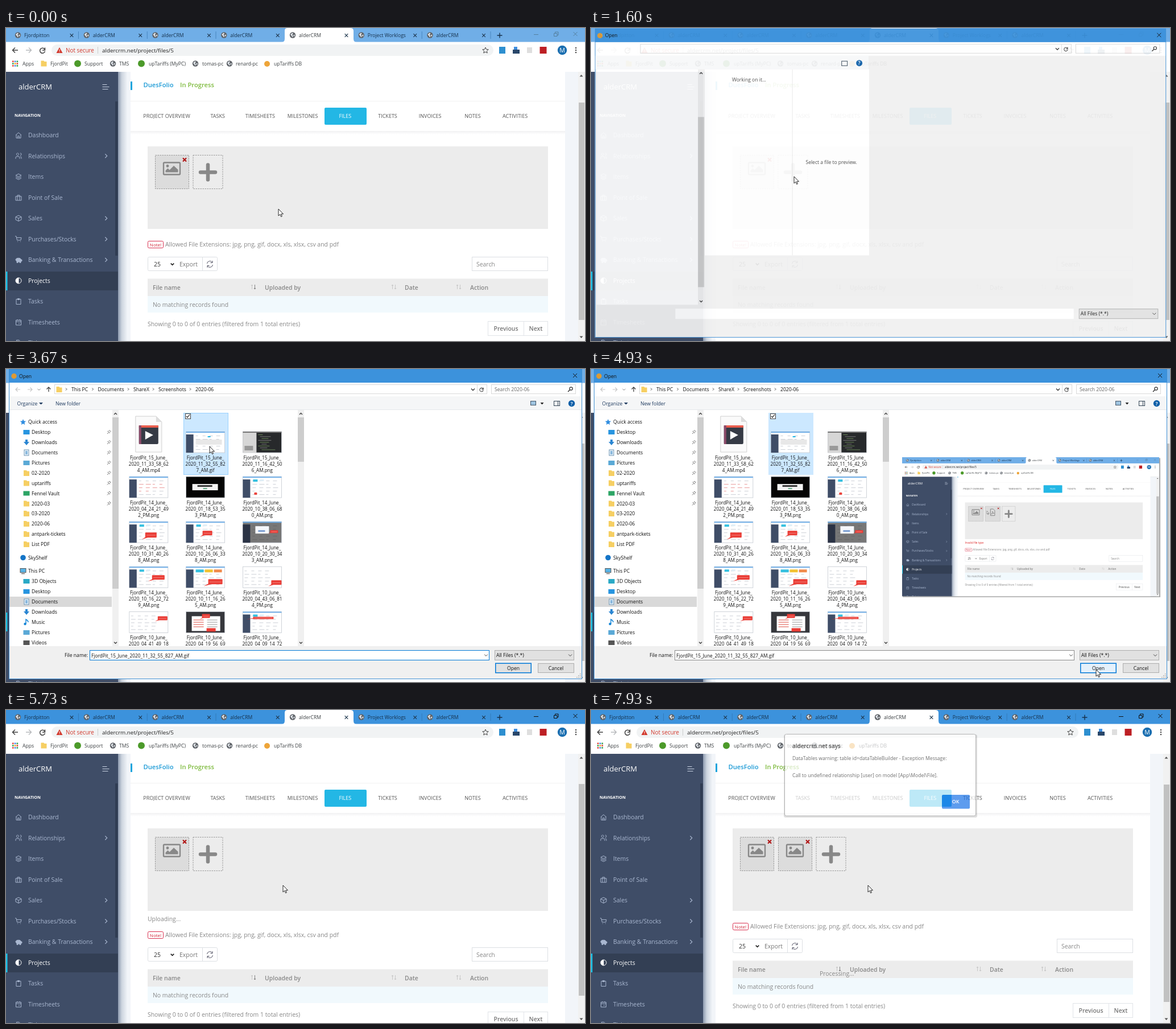
These frames come from a looping animation (1018x550 px, 8 s). An HTML page:

```html
<!DOCTYPE html>
<html lang="en">
<head>
<meta charset="utf-8">
<title>File upload</title>
<style>
html, body { margin: 0; width: 100%; height: 100%; overflow: hidden; background: #fff; }
svg { display: block; font-family: "Open Sans", "Noto Sans", sans-serif; }
text { white-space: pre; }
</style>
</head>
<body>
<svg width="1018" height="550" viewBox="0 0 1018 550">
  <defs>
    <linearGradient id="side"><stop stop-color="#8c99ae"/><stop offset=".3" stop-color="#cdd5df"/><stop offset=".75" stop-color="#f2f5f9"/></linearGradient>
    <linearGradient id="fall" x2="0" y2="1"><stop stop-color="#f1f1f2"/><stop offset="1" stop-color="#fff"/></linearGradient>
    <clipPath id="list"><rect x="200" y="72" width="313" height="415"/></clipPath>
    <clipPath id="stage"><rect width="1018" height="550"/></clipPath>
  </defs>
  <g id="page"></g><g id="dialog"></g><g id="alert"></g><g id="cursor"></g>
</svg>
<script>
const LOOP = 8000, BLUE = '#3c92dc', PALE = '#70aee7', INK = '#3c4043', GREY = '#888', SIDE = '#3f4d67';
const $ = id => document.getElementById(id);

// Drawing helpers, each returns markup
const R = (x, y, w, h, f, a = '') => `<rect x="${x}" y="${y}" width="${w}" height="${h}" fill="${f}" ${a}/>`;
const box = (x, y, w, h, line, f = 'none', a = '') => R(x + .5, y + .5, w - 1, h - 1, f, `stroke="${line}" ${a}`);
const C = (x, y, r, f, a = '') => `<circle cx="${x}" cy="${y}" r="${r}" fill="${f}" ${a}/>`;
const T = (x, y, s, c = GREY, z = 10.43, a = '') => `<text x="${x}" y="${y}" fill="${c}" font-size="${z}" ${a}>${s}</text>`;
const L = (d, c, w = 1, a = '') => `<path d="${d}" stroke="${c}" stroke-width="${w}" fill="none" ${a}/>`;
const F = (d, c, a = '') => `<path d="${d}" fill="${c}" ${a}/>`;
const G = (x, y, s, a = '') => `<g transform="translate(${x} ${y}) ${a}">${s}</g>`;
const UI = (x, y, s, c = '#111', z = 8.6, a = '') => T(x, y, s, c, z, a);
const MID = 'text-anchor="middle" ', SEMI = 'font-weight="600"';
const cross = (x, y, r, c, w) => L(`M${x - r} ${y - r}l${2 * r} ${2 * r}m0 ${-2 * r}l${-2 * r} ${2 * r}`, c, w);
const chevron = (x, y, r, c, w = 1) => L(`M${x - r} ${y - r / 2}l${r} ${r} ${r} ${-r}`, c, w);
const right = (x, y, r, c, w = 1) => L(`M${x - r / 2} ${y - r}l${r} ${r} ${-r} ${r}`, c, w);
const reload = (x, y, r, c, w) => L(`M${x + r} ${y - r}v${r}h${-r}M${x + r * .9} ${y - r * .3}a${r} ${r} 0 1 0 ${r * .1} ${r * .7}`, c, w);
const folder = (x, y) => F(`M${x - 5} ${y - 5}h5l1 1.5h4v8.5h-10z`, '#f6cf63');
const globe = (x, y) => C(x, y, 5.2, '#5f6368') + F(`M${x - 4} ${y - 1}l3-3 2 1-2 3 2 1-1 3zM${x + 1} ${y}l3-1-1 4z`, '#dfe3e8');

const MENU = [
  ['Dashboard', 'M-5 0L0-4.5 5 0M-4-1V5H4V-1M-1.3 5V1.5H1.3V5'],
  ['Relationships', 'M-5 5V3a2 2 0 0 1 2-2H0a2 2 0 0 1 2 2V5M-1.5-1a2 2 0 1 0-.1 0M3-5a2 2 0 0 1 0 4M3 1a2 2 0 0 1 2 2V5', 1],
  ['Items', 'M0-5L5-2.5 0 0-5-2.5ZM-5 0L0 2.5 5 0M-5 2.5L0 5 5 2.5'],
  ['Point of Sale', 'M-5-2H5V5H-5ZM-2-2V-4H2V-2M-2-2V5M2-2V5'],
  ['Sales', 'M0-5L5-2.5V2.5L0 5-5 2.5V-2.5ZM-5-2.5L0 0 5-2.5M0 0V5', 1],
  ['Purchases/Stocks', 'M-6-5H-4L-2.5 2H4L5-2.5H-3.5M-2 4.5h.8M3 4.5h.8', 1],
  ['Banking &amp; Transactions', 'M-5 0C-5-4 4-4 4-1L6 0V2L4 3V5H2V3.5H-1V5H-3V3Z', 1],
  ['Projects', 'M0-5A5 5 0 0 0 0 5ZM0-5A5 5 0 0 1 0 5'],
  ['Tasks', 'M-4-4H4V5H-4ZM-1.5-5H1.5V-3H-1.5Z'],
  ['Timesheets', 'M-4.5-3.5H4.5V5H-4.5ZM-4.5-1H4.5M-2-5V-3M2-5V-3M0 2h2'],
  ['Tickets', 'M-3.5-5H1L3.5-2V5H-3.5Z'],
];

function sidebar() {
  let s = R(197, 77, 22, 480, 'url(#side)') + R(0, 77, 197, 480, SIDE) + R(192, 129, 4.5, 271, '#303c52')
    + R(0, 428, 197, 33, '#333f54') + R(0, 428, 2.5, 33, '#1dc4e9')
    + T(22, 108, 'alderCRM', '#fff', 13) + L('M169.500 99.500h8M169.500 103.500h12M169.500 107.500h10', '#c8d2e2', 1.2)
    + T(15, 155.5, 'NAVIGATION', '#fff', 7.3, 'font-weight="700"');
  MENU.forEach(([name, icon, more], i) => {
    const y = 188.3 + i * 36.52, c = i == 7 ? '#fff' : '#a9b7d0';
    s += G(22, y, i == 6 || i == 7 ? F(icon.split('M0-5A5 5 0 0 1')[0], c) + L(icon, c) : L(icon, c))
      + T(39, y + 3.8, name, c) + (more ? right(176, y, 3.4, c, 1.2) : '');
  });
  return s;
}

function chrome(active) {
  let s = R(0, 0, 1018, 25, active ? BLUE : PALE) + R(0, 24.5, 1018, 52.5, '#fff')
    + F('M484 25q6 0 6-6V5q0-5 5-5h110q6 0 6 5v14q0 6 6 6z', '#fff');
  const titles = ['Fjordpitton', 'alderCRM', 'alderCRM', 'alderCRM', 'alderCRM', 'Project Worklogs', 'alderCRM'];
  titles.forEach((name, i) => {
    const x = 21 + i * 120.75;
    s += globe(x, 12.5) + UI(x + 11, 16, name, i == 4 ? INK : '#17324d') + cross(x + 94.5, 13, 2.8, '#20384f', 1.2);
    if (i != 3 && i != 4) s += R(x + 106, 6, 1, 13, '#2f6ea8', 'opacity=".6"');
  });
  const cap = active ? '#111' : '#55809f';
  s += L('M863.500 13h9M868 8.500v9', '#17324d', 1.4) + L('M928 11.500h8M963.500 9.500h5.500v5h-5.500zM965.500 9v-2h5.500v5.500h-2', cap) + cross(1001, 10.5, 3.5, cap, 1)
    + L('M21 39h-9M16 34.500l-4.500 4.500 4.500 4.500', '#444', 1.5) + L('M35 39h9M40 34.500l4.500 4.500-4.500 4.500', '#b8babd', 1.4) + reload(64, 39, 4.5, '#444', 1.5)
    + R(80, 29, 777, 20, '#f1f3f4', 'rx="10"') + F('M94 34l5.500 10h-11z', '#d2382c') + R(93.5, 37.5, 1.1, 3, '#fff') + R(93.5, 41.5, 1.1, 1, '#fff')
    + UI(105, 42.5, 'Not secure', '#d2382c', 9.9) + R(161, 33, 1, 12, '#ccc') + UI(169, 42.5, 'aldercrm.net/project/files/5', '#222', 9.85)
    + L('M843 34l1.500 3.500 3.700.300-2.800 2.500.800 3.700-3.200-2-3.200 2 .800-3.700-2.800-2.500 3.700-.300z', '#444')
    + R(867, 33, 11, 12, '#2d8fd0') + R(891, 38, 12, 7, '#29476a') + R(893, 33, 6, 5, '#3f8ee0') + R(916, 34, 9, 10, '#dedede') + R(938.5, 33, 12, 12, '#bd1f24')
    + C(978, 39, 8.2, '#1a6eb0') + UI(978, 42.8, 'M', '#fff', 10.5, MID);
  for (const y of [35, 39, 43]) s += C(1002, y, 1.2, '#444');
  for (let i = 0; i < 9; i++) s += R(11 + i % 3 * 3.8, 57.5 + (i / 3 | 0) * 3.8, 2.6, 2.6, ['#e2443b', '#f3a51d', '#35a252', '#4285f4'][(i * 3 + (i / 3 | 0)) % 4]);
  const marks = [[29, 'Apps'], [78, 'FjordPit'], [138, 'Support'], [199, 'TMS'], [251, 'upTariffs (MyPC)'], [345, 'tomas-pc'], [404, 'renard-pc'], [471, 'upTariffs DB']];
  for (const [x, name] of marks) s += UI(x, 66, name, INK);
  return s + folder(66.5, 62.5) + C(126, 62.5, 6, '#4c9a2a') + C(238, 62.5, 6, '#4c9a2a') + globe(188, 62.5) + globe(333, 62.5) + globe(393, 62.5) + C(459, 63, 5, '#eea53a');
}

const picture = L('M278.500 236.500h26q1.500 0 1.500 1.500v18q0 1.500-1.500 1.500h-26q-1.500 0-1.500-1.500v-18q0-1.500 1.500-1.500z', GREY, 2.4)
  + C(284, 242.5, 2.4, GREY) + F('M280.500 253.500v-3l4-4 3 3 7.500-7.500 7.500 7v4.500z', GREY);
const pdf = L('M283 234h11l6 6v20h-17z', GREY, 2.2) + L('M286 255q6-7 5-12 1 8 7 8-6-1-12 4', GREY, 1.8);
const dashed = (w, f) => R(262.5, 223.5, w, 59, f, 'stroke="#999" stroke-dasharray="2.5 1.5"');
const card = (x, icon) => G(x, 0, dashed(59, '#dcdcdc') + icon + cross(314, 231.5, 3, '#b00d0d', 2));

function files() {
  let s = box(249, 374, 28, 13, '#d9304f', '#fff', 'rx="2"') + T(263, 383.5, 'Note!', '#cf2436', 8, MID)
    + T(280, 384, 'Allowed File Extensions: jpg, png, gif, docx, xls, xlsx, csv and pdf')
    + box(249, 402, 123, 25, '#dcdfe3', '#fff', 'rx="2"') + R(345, 402, 1, 25, '#dcdfe3') + T(260, 418.8, '25', '#333') + chevron(292.5, 415, 2.8, '#222', 1.6)
    + T(305, 418.8, 'Export', '#777') + L('M353.500 414a5 5 0 0 1 9.300-2M363 409v3.500h-3.500M363.500 416a5 5 0 0 1-9.300 2M354 421v-3.500h3.500', '#556')
    + box(819, 402, 134, 25, '#dcdfe3', '#fff') + T(827, 418.8, 'Search')
    + R(249, 440.5, 704, 30.5, '#ececec') + R(249, 471, 704, 29, '#f1f9fd');
  for (const [x, name] of [[258, 'File name'], [455, 'Uploaded by'], [701, 'Date'], [816, 'Action']]) s += T(x, 460, name, GREY, 10.43, SEMI);
  [435, 682, 796].forEach((x, i) => {
    s += L(`M${x - 2.5} 459v-8m-1.500 2l1.500-2 1.500 2`, '#c4c4c4', .9) + L(`M${x + 2.5} 451v8m-1.500-2l1.500 2 1.500-2`, i ? '#c4c4c4' : '#777', .9);
  });
  return s + T(258, 489.5, 'No matching records found') + T(249, 524, 'Showing 0 to 0 of 0 entries (filtered from 1 total entries)')
    + box(847, 515, 106, 26, '#e1e4e8', '#fff') + R(910, 515, 1, 26, '#e1e4e8') + T(879, 532, 'Previous', '#777', 10.43, MID + SEMI) + T(931.5, 532, 'Next', '#777', 10.43, MID + SEMI);
}

function page({ active, icons = [picture], status = '', color = GREY, dy = 0, bar = [131, 382], busy }) {
  let s = R(219, 60, 764, 530, '#fff') + R(219, 94, 3, 15, '#1ba5dd') + T(241.5, 104, 'DuesFolio', '#1b9ad6', 11.2, SEMI) + T(306, 104, 'In Progress', '#7dba3c', 11.2, SEMI)
    + R(219, 128, 764, 1, '#f1f1f1') + R(219, 181, 764, 6, 'url(#fall)') + R(560, 140, 74, 30, '#23b7e5', 'rx="2"');
  ['PROJECT OVERVIEW', 'TASKS', 'TIMESHEETS', 'MILESTONES', 'FILES', 'TICKETS', 'INVOICES', 'NOTES', 'ACTIVITIES'].forEach((name, i) => {
    s += T(i ? 297.5 + i * 74.7 : 282.5, 158, name, i == 4 ? '#fff' : '#555', 9, MID);
  });
  s += R(249, 208, 704, 145, '#ececec') + icons.map((icon, i) => card(i * 67, icon)).join('')
    + G(icons.length * 67 - .5, 0, dashed(52, 'none') + L('M275.500 253.500h26M288.500 240.500v26', GREY, 6.5, 'stroke-linecap="round"'))
    + T(249, 371, status, color) + G(0, status ? 15 : 0, files());
  if (busy) s += T(402, 467, 'Processing...');
  return R(0, 77, 1018, 480, '#f2f5f9') + G(0, dy, s) + sidebar()
    + R(1006, 77, 12, 480, '#f1f1f1') + R(1007, bar[0], 10, bar[1], '#c1c1c1')
    + F('M1008.500 85.500h6l-3-3.500zM1008.500 541.500h6l-3 3.500z', '#555') + chrome(active);
}

const SHOTS = [
  ['15', '11_33_58_624_AM.mp4', 'video'], ['15', '11_32_55_827_AM.gif', 'drop'], ['15', '11_16_42_506_AM.png', 'code'],
  ['14', '04_24_21_492_PM.png', 'rows'], ['14', '01_18_53_353_PM.png', 'dark'], ['14', '10_38_06_680_AM.png', 'app', 20, 28, 5, 4],
  ['14', '10_31_40_268_AM.png', 'app', 28, 19, 20, 9], ['14', '10_26_06_338_AM.png', 'app', 29, 16, 17, 8], ['14', '10_20_30_343_AM.png', 'dim', 48, 15, 14, 5],
  ['14', '10_16_22_729_AM.png', 'app', 40, 15, 22, 8], ['14', '10_11_16_265_AM.png', 'tiles', 39, 22, 25, 9], ['10', '04_43_06_814_PM.png', 'table', 50, 24, 18, 8],
  ['10', '04_41_49_182_PM.png', 'table', 50, 8, 17, 7], ['10', '04_19_56_694_PM.png', 'black', 28, 4, 14, 7], ['10', '04_09_14_721_PM.png', 'app', 18, 9, 36, 4],
];
const PICK = 'FjordPit_15_June_2020_11_32_55_827_AM.gif';
const DARK = { code: '#27292b', dark: '#050505', black: '#36373c' };

function shot(kind, x, y, w, h) {
  if (kind == 'video') return F('M11-27h36l10 10v53H11z', '#fafafa', 'stroke="#d0d0d0"') + F('M47-27v10h10z', '#ddd')
    + R(17, -11, 34, 33, '#353a45', 'rx="2"') + R(17, -11, 34, 4, '#e95d4d') + R(17, -11, 4, 33, '#8a4a68') + F('M28-1l14 7-14 8z', '#fff');
  const plain = kind == 'table', dim = kind == 'dim';
  let s = R(0, 0, 68, 37, DARK[kind] || (dim ? '#777' : '#fff'), 'stroke="#c4c9d0" stroke-width=".8"');
  if (!DARK[kind]) {
    if (!plain) s += R(0, 0, 68, 2, PALE) + R(0, 5, 13, 32, dim ? '#2b3345' : SIDE);
    for (let i = 0; i < 20; i++) s += R((plain ? 3 : 17) + i % 4 * 12, 7 + (i >> 2) * 6, 4 + i * 7 % 6, 1, dim ? '#686868' : kind == 'rows' && i > 3 && i < 14 ? '#ea9b9b' : '#ccd0d6');
  }
  if (kind == 'app') s += R(18, 5, 8, 4, '#35c0df') + R(30, 5, 7, 3, '#dfeef6');
  if (kind == 'tiles') ['#35c0df', '#f2c230', '#f08a4b'].forEach((c, i) => { s += R(17 + i * 16, 5, 14, 5, c); });
  if (kind == 'drop') s += R(17, 14, 46, 9, '#e8e8e8') + R(38, 8, 5, 2, '#23b7e5');
  if (kind == 'code') {
    s += R(0, 0, 24, 37, '#d6d6d6') + R(0, 0, 68, 2, '#777') + R(3, 25, 15, 8, '#999');
    for (let i = 0; i < 9; i++) s += R(27 + i % 3 * 3, 5 + i * 3.3, 8 + i * 11 % 18, 1, i % 2 ? '#777' : '#688456');
  }
  if (kind == 'dark') s += R(11, 13, 45, 11, '#f4f4f4') + R(20, 15, 26, 3, '#333') + R(30, 20, 7, 2, '#6a8');
  if (dim) s += R(22, 8, 24, 13, '#f5f7fb') + R(27, 15, 12, 3, '#7b9ed2');
  if (kind == 'black') {
    s += R(10, 8, 50, 26, '#fff') + R(36, 29, 16, 6, '#ea3d36');
    for (let i = 0; i < 8; i++) s += R(13 + i % 2 * 24, 14 + (i >> 1) * 4, 18, 1.2, i % 2 ? '#aaa' : '#e36b61');
  }
  if (w) s += F(`M${x + 2} ${y + h - 2}l${-w * .4} ${h * .6} ${w * .8} ${-h * .6}z`, '#ea3d36') + R(x, y, w, h, '#ea3d36', 'rx="1"') + R(x + 2, y + h / 2, w - 4, .6, '#f6aaa5');
  return s;
}

const grid = () => SHOTS.map(([day, name, ...art], i) => {
  const x = 250.8 + i % 3 * 99.8, y = (i / 3 | 0) * 79.1;
  const lines = [`FjordPit_${day}_June_`, '2020_' + name.slice(0, 11), name.slice(11)];
  return G(x - 34, 110 + y, shot(...art)) + lines.map((s, k) => UI(x, 159 + y + k * 11, s, '#111', 8.1, MID)).join('');
}).join('');

const TREE = [
  [93, 'Quick access', 'star'], [111, 'Desktop', '#2795e0'], [129, 'Downloads', 'down'], [147, 'Documents', 'doc'], [165, 'Pictures', '#5aa9d6'],
  [183, '02-2020'], [200.5, 'uptariffs'], [218.5, 'Fennel Vault', '#2da565'], [236.5, '2020-03'], [254, '03-2020'], [272, '2020-06'], [290, 'antpark-tickets'], [308, 'List PDF'],
  [331.5, 'SkyShelf', 'disc'], [355, 'This PC', 'pc'], [373, '3D Objects', '#29a9c6'], [391, 'Desktop', '#2795e0'], [409, 'Documents', 'doc'],
  [427, 'Downloads', 'down'], [445, 'Music', 'note'], [463, 'Pictures', '#5aa9d6'], [481, 'Videos', '#555'],
];
const ICONS = {
  star: F('M0-5l1.500 3.500 3.700.300-2.800 2.500.800 3.700-3.200-2-3.200 2 .800-3.700-2.800-2.500 3.700-.300z', '#2f8de0'),
  down: F('M-2-5h4v4h3l-5 6-5-6h3z', '#2a86d2'), doc: R(-4, -5, 8, 10, '#eaf3fa', 'stroke="#6b93b3"') + L('M-2-2h4M-2 0h4M-2 2h4', '#2a7fc0'),
  disc: C(0, 0, 4.8, '#1575c7'), pc: box(-5.5, -5, 11, 8, '#555', '#58b5e8') + R(-3, 4, 6, 1.2, '#555'),
  note: L('M-1 3V-5Q3-3 3 0', '#1787d8', 1.5) + C(-2.5, 3, 2.2, '#1787d8'),
};

function tree() {
  let s = R(6, 400, 180, 18, '#d9d9d9');
  TREE.forEach(([y, name, icon], i) => {
    const top = [0, 13, 14].includes(i), x = top ? 30 : 36;
    s += (icon ? G(x, y, ICONS[icon] || R(-5.5, -4, 11, 8, icon)) : folder(x, y)) + UI(top ? 39 : 45, y + 3, name);
    if (i > 0 && i < 9) s += L(`M178 ${y + 3}l2.500-2.500m-2-2.500l4 4m-2.500-3.500l2-2 2 2-2 2`, '#777');
  });
  return s;
}

const bars = (x, y, h) => R(x, 72, 11, 415, '#f0f0f0') + R(x, y, 11, h, '#cdcdcd') + chevron(x + 5.5, 481, 2.5, '#444', 1.4) + L(`M${x + 3} 80l2.500-2.500 2.500 2.500`, '#444', 1.4);
const combo = box(859, 494, 140, 18, '#adadad', '#e1e1e1') + UI(862, 506, 'All Files (*.*)') + chevron(992, 503, 3, '#444');

function frame() {
  return R(5, 0, 1008, 545, '#f0f0f0') + R(5, 24, 1008, 24, '#fff') + R(5, 0, 1008, 24, BLUE) + box(5, 0, 1008, 545, '#3f8fd4')
    + C(14, 12.5, 4.7, '#dd9a35') + UI(23, 15.5, 'Open') + cross(1000.5, 11.5, 3.5, '#111', 1)
    + box(85, 27, 761, 17, '#d9d9d9') + box(853, 27, 149, 17, '#d9d9d9') + chevron(821, 36, 3, '#333', 1.3) + R(828, 28, 1, 15, '#ddd') + reload(836, 36, 3.2, '#444', 1.1)
    + C(993.5, 34.5, 2.6, 'none', 'stroke="#333" stroke-width="1.2"') + L('M991.500 36.500l-3.500 3.500', '#333', 1.4);
}

function dialog({ stage, hover, sel, ready, caret, over }) {
  let s = frame();
  if (!stage) return s + R(6, 48, 482, 24, '#f7f8f9') + R(8, 72, 179, 415, '#fff') + R(199, 72, 290, 328, '#fff') + R(353, 72, 1, 328, '#e8e8e8')
    + bars(187, 156, 300) + UI(247, 93, 'Working on it...', '#444') + UI(377, 239, 'Select a file to preview.', '#444')
    + box(440, 57, 11, 9, '#345') + C(471.5, 61, 5.5, '#0f5fa8') + UI(471.5, 64.5, '?', '#fff', 9, MID + SEMI) + R(147, 494, 703, 18, '#fff') + combo;
  s += R(6, 48, 1006, 24, '#f5f6f7') + R(6, 72, 1006, 415, '#fff') + R(6, 71, 1006, 1, '#e5e7ea')
    + L('M25 36h-8m3.500-3.500l-3.500 3.500 3.500 3.500M38 36h8m-3.500-3.500l3.500 3.500-3.500 3.500', '#c6c6c6', 1.2) + chevron(58, 36, 2.5, '#888') + L('M75 40v-8m-3.500 3.500l3.500-3.500 3.500 3.500', '#444', 1.3) + folder(93.5, 36);
  for (const [x, name] of [[115, 'This PC'], [161.5, 'Documents'], [224, 'ShareX'], [268, 'Screenshots'], [333, '2020-06']]) s += UI(x, 38.5, name) + right(x - 9, 35.5, 2, '#444');
  s += UI(859, 39, 'Search 2020-06', '#666') + UI(19.5, 63.5, 'Organize', '#1e3a5f') + F('M58 59h7l-3.500 3.500z', '#1e3a5f') + UI(87, 63.5, 'New folder', '#1e3a5f')
    + box(922, 56, 10, 8, '#456', '#9fc4e0') + F('M939.500 59h6l-3 3.500z', '#222') + box(963, 56, 11, 9, '#345') + R(970, 57, 1, 7, '#345')
    + C(994.5, 60.5, 5.7, '#0f5fa8') + UI(994.5, 63.8, '?', '#fff', 9, MID + SEMI)
    + tree() + bars(187, 85, 301) + bars(513, 85, 78);
  if (stage < 2) s += UI(356, 93, 'Working on it...', '#444', 8.6, MID);
  else {
    if (hover || sel) s += box(312, 77, 79, 109, sel ? (hover ? '#99d1ff' : '#cce8ff') : '#e5f3ff', sel ? '#cce8ff' : '#e5f3ff')
      + box(315, 78, 10, 10, '#444', '#fff') + (sel ? L('M317 83l2 2 4-5', '#222', 1.2) : '');
    s += `<g clip-path="url(#list)">${grid()}</g>`;
  }
  if (!sel) s += UI(769, 283, 'Select a file to preview.', '#444', 8.6, MID);
  if (ready) {
    const view = page({ active: false, icons: [picture, pdf], status: 'Invalid file type', color: '#d22', dy: -29, bar: [155, 385] }) + G(336, 213, arrow);
    s += R(548, 156.5, 453, 244.5, '#aaa') + G(547, 155, `<g clip-path="url(#stage)">${view}</g>`, 'scale(.444)');
  }
  s += R(6, 487, 1006, 57, '#f0f0f0') + UI(103, 506, 'File name:') + box(147, 494, 703, 18, ready ? '#8a8a8a' : '#0078d7', '#fff') + chevron(844, 503, 2.8, '#444') + combo
    + (sel ? UI(150, 506.5, PICK, '#111', 8.3) : '') + (caret ? R(150, 497, 1, 12, '#111') : '')
    + R(860.75, 517.25, 62.5, 16.5, over ? '#e5f1fb' : '#e1e1e1', 'stroke="#0078d7" stroke-width="1.5"') + UI(892, 528.5, 'Open', '#111', 8.6, MID)
    + box(935, 517, 64, 17, '#adadad', '#e1e1e1') + UI(967, 528.5, 'Cancel', '#111', 8.6, MID);
  for (let i = 0; i < 6; i++) s += R(1009 - [0, 3, 6, 0, 3, 0][i], 541 - [0, 0, 0, 3, 3, 6][i], 1.5, 1.5, '#aaa');
  return s;
}

const alertBox = `<g opacity=".7">${R(339, 43, 340, 146, '#000', 'rx="3" opacity=".18"')}${R(340.5, 42.5, 336, 143.5, '#fff', 'rx="3" stroke="#999"')}`
  + UI(354, 67, 'aldercrm.net says', '#222', 9.9, SEMI) + UI(354, 88, 'DataTables warning: table id=dataTableBuilder - Exception Message:', '#333', 8.6)
  + UI(354, 118, 'Call to undefined relationship [user] on model [App\\Model\\File].', '#333', 8.6)
  + R(617, 149, 49, 24.5, '#1a73e8', 'rx="2"') + UI(641, 164, 'OK', '#fff', 8.8, MID + SEMI) + '</g>';

const arrow = F('M0 0V12L2.800 9.400 4.600 13.600 6.400 12.800 4.700 8.800H8.500Z', '#fff', 'stroke="#111" stroke-width=".9"');
const ring = (x, y, t) => C(x, y, 5.6, '#fff', 'stroke="#1b86d6" stroke-width="3.4"')
  + G(x, y, L('M0-5.600A5.600 5.600 0 0 0 0 5.600', '#5fc4f5', 2.4), `rotate(${t * .36 % 360})`);

// Pointer stops: time, x, y
const PATH = [[0, 479, 318], [60, 479, 318], [130, 466, 327], [260, 466, 327], [800, 357, 261], [2380, 357, 261], [3200, 358, 141], [3260, 358, 141],
  [3470, 358, 136], [4380, 358, 136], [4900, 888, 528], [5360, 888, 528], [5700, 487, 308], [LOOP, 487, 308]];

function pointer(t) {
  const i = PATH.findIndex(p => p[0] > t), [t0, x0, y0] = PATH[i - 1], [t1, x1, y1] = PATH[i];
  const k = (t - t0) / (t1 - t0), e = k * k * (3 - 2 * k);
  return [x0 + (x1 - x0) * e, y0 + (y1 - y0) * e];
}

// Rebuild a layer only when its state has changed
const seen = {};
function show(id, state, draw) {
  const key = JSON.stringify(state);
  if (seen[id] != key) { seen[id] = key; $(id).innerHTML = draw(state); }
}

function tick() {
  const t = performance.now() % LOOP, [x, y] = pointer(t);
  const uploading = t >= 5530 && t < 7530, done = t >= 7530;
  show('page', {
    active: t >= 800 && t < 1470 || t >= 5400, icons: done ? [picture, picture] : [picture],
    status: uploading ? 'Uploading...' : '', bar: uploading ? [130, 372] : [131, 382], busy: done,
  }, page);

  const open = t >= 1470 && t < 5500, sel = t >= 3660;
  show('dialog', open && {
    stage: t < 1750 ? 0 : t < 1950 ? 1 : 2, hover: t > 2300 && x < 391 && y > 76 && y < 186, sel, ready: t >= 3870,
    caret: !sel && Math.floor(t / 530) % 2 == 0, over: x > 860 && y > 516,
  }, s => s ? dialog(s) : '');
  const inK = Math.min(1, Math.max(0, (t - 1470) / 200)), outK = Math.min(1, Math.max(0, (t - 5330) / 170));
  const fade = t < 5330 ? 1 - (1 - inK) ** 2.5 : 1 - outK;
  $('dialog').setAttribute('opacity', fade);
  $('dialog').setAttribute('transform', `translate(509 272) scale(${.95 + .05 * fade}) translate(-509 -272)`);

  show('alert', t >= 7930, on => on ? alertBox : '');
  $('cursor').innerHTML = t >= 930 && t < 1070 ? ring(357, 260, t) : G(x, y, arrow) + (t >= 1070 && t < 1330 ? ring(368, 260, t) : '');
  requestAnimationFrame(tick);
}
tick();
</script>
</body>
</html>
```
